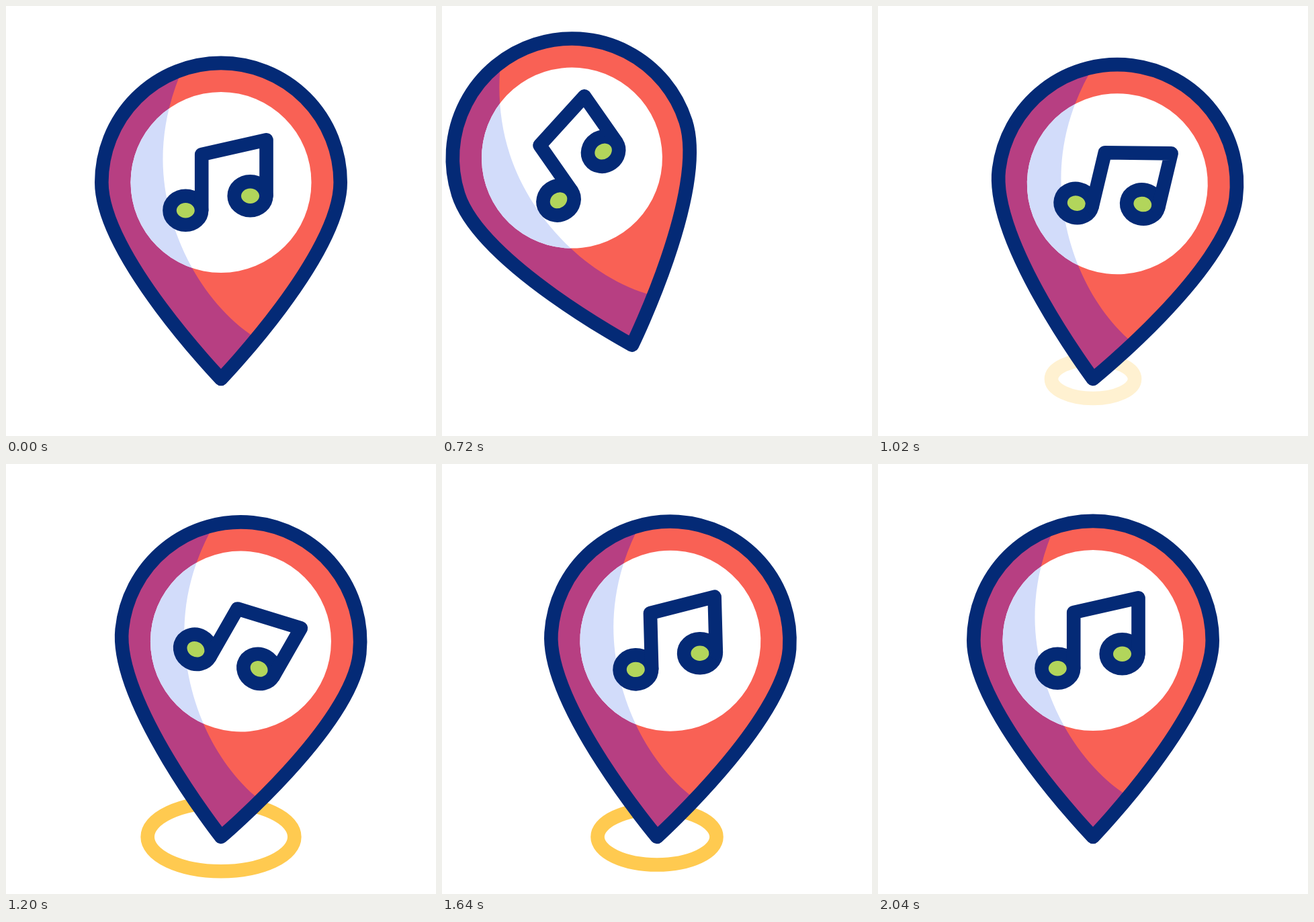
Write an HTML page with a canvas that moves like this. It is 640 by 640 pixels and loops after 2400 ms.

```html
<!DOCTYPE html>
<html lang="en">
<head>
<meta charset="utf-8">
<title>Music pin</title>
<style>
  html, body { margin: 0; width: 100%; height: 100%; overflow: hidden; background: #fff; }
  canvas { display: block; width: 100vmin; height: 100vmin; }
</style>
</head>
<body>
<canvas id="stage"></canvas>
<script>
const SIZE = 640, LOOP = 2400, LINE = 20.6;
const NAVY = '#042a76', CORAL = '#f96155', PLUM = '#b73f82';
const LILAC = '#d2dcfa', LIME = '#b2d55b', GOLD = '#ffca50';

const canvas = document.getElementById('stage');
const ctx = canvas.getContext('2d');

// Shapes, with the pin's tip at (320, 555)
const tip = { x: 320, y: 555 };
const hub = { x: 320, y: 262.5 };
const noteHub = { x: 315.5, y: 262.5 };

const pin = new Path2D(
  'M320 555 C320 555 142.3 370.5 142.3 262.5 A177.7 177.7 0 0 1 497.7 262.5 C497.7 370.5 320 555 320 555 Z');
const shade = new Path2D(
  'M262 95 L258 105 C242 145 233.5 186 233.5 228 C233.5 322 281 430 364 489 L378 498 L320 570 L100 570 L100 95 Z');
const disc = new Path2D();
disc.arc(hub.x, hub.y, 134.5, 0, Math.PI * 2);

const stems = new Path2D('M291.2 304 V221 L387.5 199.2 V282.5');
const heads = new Path2D();
for (const [x, y] of [[267.3, 304.2], [363.5, 282.7]]) {
  heads.moveTo(x + 23.8, y);
  heads.ellipse(x, y, 23.8, 21.5, 0, 0, Math.PI * 2);
}

// Keys are [time, value]
const lift = [[202, 0], [702, 1], [1000, 0]];
const sway = [[202, 0], [702, -18], [1100, 10], [1400, -6], [1700, 5], [1967, 0]];
const swing = [[200, 0], [800, -18], [1200, 24], [1500, -15], [1800, 6], [2040, 0]];
const ripples = [1000, 1500], RIPPLE = 400;

const clamp = v => Math.max(0, Math.min(1, v));
const ease = x => x * x * (3 - 2 * x);

function track(keys, t) {
  if (t <= keys[0][0]) return keys[0][1];
  for (let i = 1; i < keys.length; i++) {
    const [t0, a] = keys[i - 1], [t1, b] = keys[i];
    if (t < t1) return a + (b - a) * ease((t - t0) / (t1 - t0));
  }
  return keys[keys.length - 1][1];
}

function rotateAt(p, degrees) {
  ctx.translate(p.x, p.y);
  ctx.rotate(degrees * Math.PI / 180);
  ctx.translate(-p.x, -p.y);
}

function fill(path, color) {
  ctx.fillStyle = color;
  ctx.fill(path);
}

function stroke(path, color) {
  ctx.strokeStyle = color;
  ctx.stroke(path);
}

function drawRipple(t, start) {
  const x = (t - start) / RIPPLE;
  if (x <= 0 || x >= 1) return;
  const ry = 28.7 + 44.7 * ease(x);
  const ring = new Path2D();
  ring.ellipse(tip.x, tip.y, ry * 2.135, ry, 0, 0, Math.PI * 2);
  ctx.globalAlpha = clamp(x / 0.2) * clamp((1 - x) / 0.2);
  stroke(ring, GOLD);
  ctx.globalAlpha = 1;
}

function drawNote(t) {
  ctx.save();
  rotateAt(noteHub, track(swing, t));
  fill(heads, LIME);
  stroke(heads, NAVY);
  stroke(stems, NAVY);
  ctx.restore();
}

function drawPin(t) {
  const up = track(lift, t);
  ctx.save();
  ctx.translate(-37.5 * up, -51 * up);
  rotateAt(tip, track(sway, t));

  fill(pin, CORAL);
  ctx.save();
  ctx.clip(pin);
  fill(shade, PLUM);
  ctx.restore();

  fill(disc, '#fff');
  ctx.save();
  ctx.clip(disc);
  fill(shade, LILAC);
  ctx.restore();

  stroke(pin, NAVY);
  drawNote(t);
  ctx.restore();
}

function fit() {
  const px = Math.round(Math.min(innerWidth, innerHeight) * (devicePixelRatio || 1)) || SIZE;
  if (canvas.width !== px) canvas.width = canvas.height = px;
  ctx.setTransform(px / SIZE, 0, 0, px / SIZE, 0, 0);
}

function draw(now) {
  const t = now % LOOP;
  fit();
  ctx.fillStyle = '#fff';
  ctx.fillRect(0, 0, SIZE, SIZE);
  ctx.lineWidth = LINE;
  ctx.lineCap = ctx.lineJoin = 'round';
  for (const start of ripples) drawRipple(t, start);
  drawPin(t);
}

function loop(now) {
  draw(now);
  requestAnimationFrame(loop);
}

draw(0);
requestAnimationFrame(loop);
</script>
</body>
</html>
```
